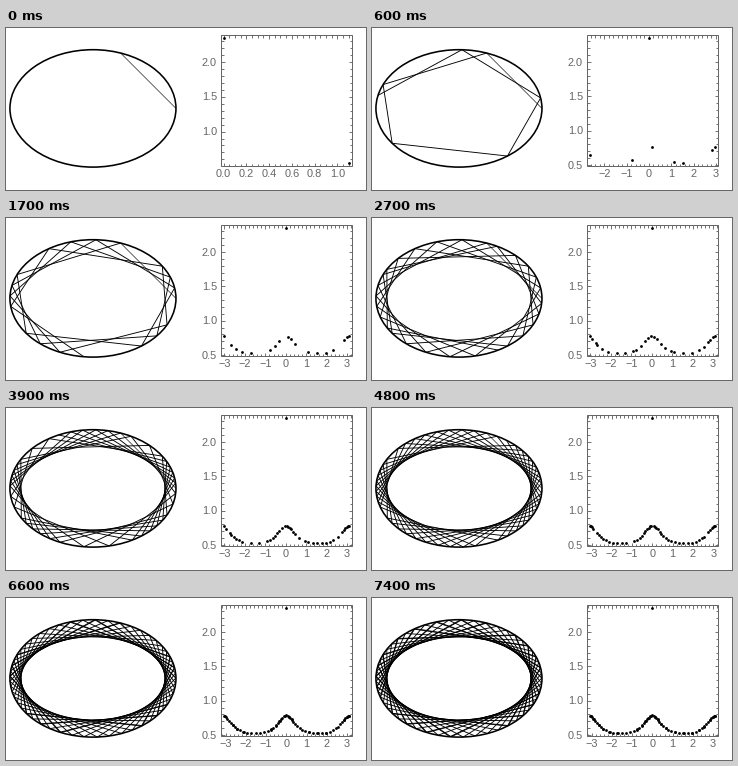
Recreate the animation shown at these times as a matplotlib script. Size 360x162 px, loop 7.5 s.

```python
import numpy as np
import matplotlib.pyplot as plt
from matplotlib.animation import FuncAnimation
from matplotlib.collections import LineCollection
from matplotlib.patches import Ellipse, Rectangle

W, H, DPI = 360, 162, 100
FRAMES, INTERVAL = 75, 100
PX = 72 / DPI                       # points per pixel
CX, CY, UNIT = 86.95, 80.4, 58.7    # billiard table centre and scale
LEFT, RIGHT, TOP, BOTTOM = 215, 346, 7, 138
GRAY = "#666666"
PAD = 0.02
SUBDIV = {0.2: 4, 0.5: 5, 1: 5}


def billiard(bounces):
    """Bounce points on x^2/2 + y^2 = 1 with (polar angle, angle to the wall)."""
    shape = np.array([0.5, 1.0])
    p = np.array([np.sqrt(2), 0.0])
    d = np.array([-1.0, 1.0]) / np.sqrt(2)
    points, phase = [p], [(0.0, 3 * np.pi / 4)]
    for _ in range(bounces):
        p = p - 2 * np.dot(p * shape, d) / np.dot(d * shape, d) * d
        n = p * shape
        n = n / np.hypot(*n)
        d = d - 2 * np.dot(d, n) * n
        points.append(p)
        phase.append((np.arctan2(p[1], p[0]), np.arcsin(abs(np.dot(d, n)))))
    return np.array(points), np.array(phase)


def limits(values):
    lo, hi = values.min(), values.max()
    pad = PAD * (hi - lo)
    return lo - pad, hi + pad


def ticks(lo, hi, step):
    """Yield (value, is_major) for every tick within the range."""
    n = SUBDIV[step]
    minor = step / n
    for i in range(int(np.ceil(lo / minor)), int(np.floor(hi / minor)) + 1):
        yield i * minor, i % n == 0


def x_step(lo, hi):
    return next((s for s in (0.2, 0.5) if (hi - lo) / s < 7), 1)


points, phase = billiard(FRAMES)
track = np.column_stack([CX + UNIT * points[:, 0], CY - UNIT * points[:, 1]])
chords = np.stack([track[:-1], track[1:]], axis=1)
widths = np.full(FRAMES, 0.9 * PX)
widths[0] = 0.6 * PX                # the opening shot is finer

plt.rcParams["font.family"] = "Liberation Sans"
fig = plt.figure(figsize=(W / DPI, H / DPI), dpi=DPI, facecolor="white")
ax = fig.add_axes([0, 0, 1, 1])
ax.set_xlim(0, W)
ax.set_ylim(H, 0)
ax.axis("off")

paths = LineCollection([], colors="black", linewidths=widths)
marks = LineCollection([], colors=GRAY, linewidths=0.9 * PX)
ax.add_collection(paths, autolim=False)
ax.add_collection(marks, autolim=False)
ax.add_patch(Ellipse((CX, CY), 2 * np.sqrt(2) * UNIT, 2 * UNIT, fill=False,
                     ec="black", lw=1.6 * PX, zorder=3))
ax.add_patch(Rectangle((LEFT, TOP), RIGHT - LEFT, BOTTOM - TOP, fill=False,
                       ec=GRAY, lw=PX))
dots, = ax.plot([], [], "o", color="black", ms=2.8 * PX, mew=0, zorder=4)


def make_labels(count, ha):
    return [ax.text(0, 0, "", ha=ha, va="baseline", color=GRAY,
                    fontsize=11 * PX) for _ in range(count)]


x_labels = make_labels(8, "center")
y_labels = make_labels(5, "right")


def fill(labels, entries):
    for label in labels:
        label.set_text("")
    for label, (x, y, text) in zip(labels, entries):
        label.set_position((x, y))
        label.set_text(text)


def update(k):
    paths.set_segments(chords[:k + 1])
    data = phase[:k + 2]
    x0, x1 = limits(data[:, 0])
    y0, y1 = limits(data[:, 1])

    def to_x(v):
        return LEFT + (v - x0) / (x1 - x0) * (RIGHT - LEFT)

    def to_y(v):
        return BOTTOM - (v - y0) / (y1 - y0) * (BOTTOM - TOP)

    dots.set_data(to_x(data[:, 0]), to_y(data[:, 1]))

    segments, x_text, y_text = [], [], []
    step = x_step(x0, x1)
    for v, major in ticks(x0, x1, step):
        x, size = to_x(v), 3.5 if major else 2.5
        segments += [[(x, BOTTOM), (x, BOTTOM - size)],
                     [(x, TOP), (x, TOP + size)]]
        if major:
            text = f"{v:.0f}" if step == 1 else f"{abs(v):.1f}"
            x_text.append((x, 149.2, text.replace("-", "\u2212")))
    for v, major in ticks(y0, y1, 0.5):
        y, size = to_y(v), 3.5 if major else 2.5
        segments += [[(LEFT, y), (LEFT + size, y)],
                     [(RIGHT, y), (RIGHT - size, y)]]
        if major:
            y_text.append((211, y + 3.5, f"{v:.1f}"))
    marks.set_segments(segments)
    fill(x_labels, x_text)
    fill(y_labels, y_text)
    return []


anim = FuncAnimation(fig, update, frames=FRAMES, interval=INTERVAL,
                     repeat=True, repeat_delay=0, blit=False)
plt.show()
```
